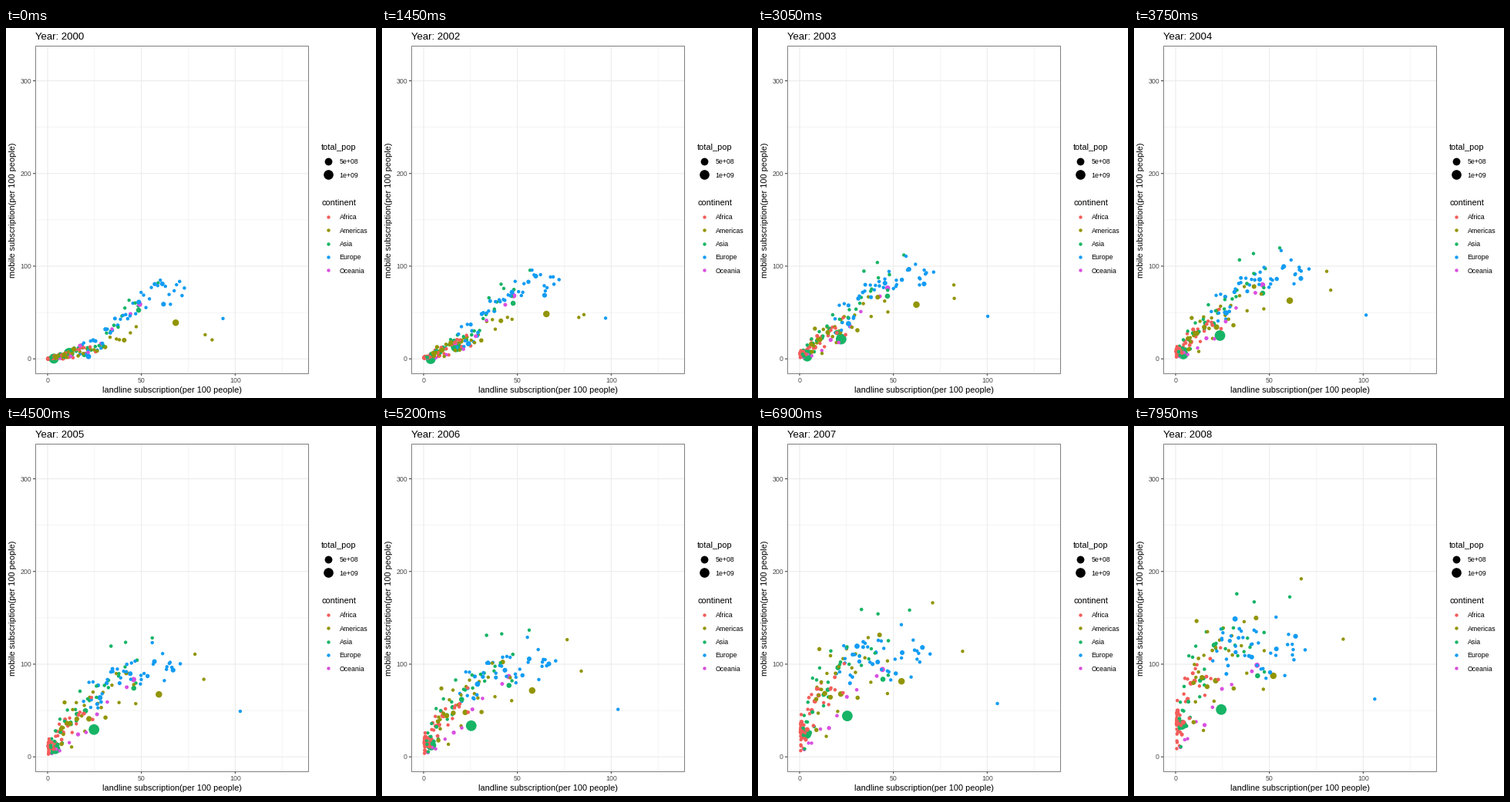
A matplotlib script for the animation above (8000 ms loop, 480 px wide and 480 px high).

```python
import numpy as np
import matplotlib.pyplot as plt
from matplotlib.animation import FuncAnimation
from matplotlib.patches import Rectangle

plt.rcParams["font.family"] = "Liberation Sans"
SIZE, DPI = 480, 100
FRAMES, STEP = 160, 50
YEARS_PER_FRAME = 9 / 170
SPAN = (FRAMES - 1) * YEARS_PER_FRAME
PT = 72 / DPI
SMALL = 4.4
LEFT, RIGHT, TOP, BOTTOM = 37.9, 391.9, 22.7, 447.7
COLORS = {"Africa": "#F35E5A", "Americas": "#929504", "Asia": "#17B466",
          "Europe": "#129CF3", "Oceania": "#D950E0"}

# count, landline range, skew towards the low end, first mobile ceiling,
# landline scale and shift, last mobile base, slope, ceiling and spread
GROUPS = {
    "Africa": (50, 0.2, 26, 4.0, 35, 0.95, 0.4, 28, 6.0, 90, 16),
    "Americas": (28, 4, 48, 1.8, 30, 0.85, 6, 72, 1.3, 125, 25),
    "Asia": (34, 1, 50, 1.7, 75, 0.95, 1, 45, 3.2, 118, 24),
    "Europe": (42, 17, 74, 1.1, 72, 0.82, 6, 112, 0.0, 112, 18),
    "Oceania": (10, 1, 54, 1.5, 55, 0.85, 1, 12, 2.2, 105, 10)}

# Standout dots: landline and mobile in the first, fourth and last year.
STANDOUTS = [
    ("Asia", 13.8, (11.4, 23.7, 24.4), (6, 25.3, 51)),
    ("Asia", 13, (3.3, 4.1, 3.3), (0.3, 5, 34.5)),
    ("Americas", 8.5, (68.3, 60.8, 52.1), (39, 63, 87.5)),
    ("Americas", 7.2, (17.8, 21.8, 21.4), (13.4, 34.5, 82)),
    ("Asia", 6.6, (48.5, 46.4, 43.7), (52.5, 71, 87.5)),
    ("Europe", 6.8, (21.8, 27, 31.7), (2.5, 50, 148.5)),
    ("Europe", 6.2, (61.8, 66.8, 64), (59, 87, 130)),
    ("Asia", SMALL, (58.9, 55.5, 60.8), (82, 120, 172.5)),
    ("Europe", SMALL, (93.5, 101.6, 106.2), (43.5, 47.3, 62.3)),
    ("Americas", SMALL, (84, 82.7, 89.3), (26, 74.5, 127)),
    ("Americas", SMALL, (87.7, 80.5, 67), (20.5, 95, 192))]

rng = np.random.default_rng(11)


def px(v):
    return 54 + 2.433 * v


def py(v):
    return 429.2 - 1.2023 * v


def make_group(n, low, high, skew, top, scale, shift, base, slope, cap, spread):
    """Start and end points, growth exponents and diameters of one group."""
    rank = (np.arange(n) + rng.uniform(0.2, 0.8, n)) / n
    x0 = low + (high - low) * rank ** skew
    y0 = top / (1 + np.exp((37 - x0) / 6)) * rng.uniform(0.7, 1.1, n)
    y0 += rng.uniform(0, 0.75, n) * np.minimum(x0, 18)
    x1 = x0 * scale + shift + rng.normal(0, 0.05, n) * x0
    y1 = np.minimum(base + slope * x1, cap) + rng.normal(0, spread, n)
    y1 = np.maximum(y1, y0 + rng.uniform(2, 12, n))
    power = 0.85 + 1.2 * np.exp(-y0 / 12)
    width = SMALL + 2.5 * rng.uniform(0, 1, n) ** 6
    return np.column_stack([x0, y0, x1, y1, power, width])


crowd = np.vstack([make_group(*g) for g in GROUPS.values()])
X0, Y0, X1, Y1, POWER, WIDTH = crowd.T
hues = [COLORS[name] for name, g in GROUPS.items() for _ in range(g[0])]
hues += [COLORS[s[0]] for s in STANDOUTS]
widths = np.append(WIDTH, [s[1] for s in STANDOUTS])
curves = [[np.polyfit([0, 4, SPAN], c, 2) for c in s[2:]] for s in STANDOUTS]

# Large dots lie under the small ones, which are mixed at random.
order = rng.permutation(len(widths))
order = order[np.argsort(-np.floor(widths[order] / 7), kind="stable")]


def at_year(year):
    u = year / SPAN
    free = np.column_stack([X0 + (X1 - X0) * u, Y0 + (Y1 - Y0) * u ** POWER])
    lead = [[np.polyval(cx, year), np.polyval(cy, year)] for cx, cy in curves]
    return np.vstack([free, lead])


def positions(year):
    """Straight, even moves between whole years."""
    low = np.floor(year)
    part = year - low
    xy = at_year(low) * (1 - part) + at_year(low + 1) * part
    return np.column_stack([px(xy[:, 0]), py(xy[:, 1])])[order]


def area(diameter):
    return (np.asarray(diameter) * PT) ** 2


fig = plt.figure(figsize=(SIZE / DPI, SIZE / DPI), dpi=DPI, facecolor="white")
ax = fig.add_axes([0, 0, 1, 1])
ax.set_xlim(0, SIZE)
ax.set_ylim(SIZE, 0)
ax.axis("off")


def label(x, y, text, size=8.8, color="black", **kw):
    return ax.text(x, y, text, fontsize=size * PT, color=color, **kw)


def line(xs, ys, color, width):
    ax.plot(xs, ys, color=color, lw=width * PT, solid_capstyle="butt",
            snap=False, zorder=1)


def dot(y, diameter, color, text):
    ax.scatter([418.1], [y], s=area(diameter), c=color, linewidths=0)
    label(432.5, y + 3.3, text)


for v in (25, 75, 125):
    line([px(v)] * 2, [TOP, BOTTOM], "#EBEBEB", 0.53)
for v in (50, 150, 250):
    line([LEFT, RIGHT], [py(v)] * 2, "#EBEBEB", 0.53)
for v in (0, 50, 100):
    line([px(v)] * 2, [TOP, BOTTOM], "#EBEBEB", 1.07)
    line([px(v)] * 2, [BOTTOM, BOTTOM + 3.2], "#333333", 1.07)
    label(px(v), 460, str(v), color="#4D4D4D", ha="center")
for v in (0, 100, 200, 300):
    line([LEFT, RIGHT], [py(v)] * 2, "#EBEBEB", 1.07)
    line([LEFT - 2.8, LEFT], [py(v)] * 2, "#333333", 1.07)
    label(33, py(v) + 3.1, str(v), color="#4D4D4D", ha="right")
ax.add_patch(Rectangle((LEFT, TOP), RIGHT - LEFT, BOTTOM - TOP, fill=False,
                       ec="#7F7F7F", lw=PT, zorder=5))

label(215.5, 473, "landline subscription(per 100 people)", 11, ha="center")
label(14, 236, "mobile subscription(per 100 people)", 11, rotation=90,
      ha="right", va="center")
title = label(38, 15, "", 13.2)

label(409, 158, "total_pop", 11)
dot(173, 9.8, "black", "5e+08")
dot(190.3, 12.6, "black", "1e+09")
label(409, 230, "continent", 11)
for i, (name, color) in enumerate(COLORS.items()):
    dot(245.2 + 17.28 * i, SMALL, color, name)

dots = ax.scatter(*positions(0).T, s=area(widths[order]),
                  c=[hues[i] for i in order], linewidths=0, zorder=3)


def update(i):
    year = i * YEARS_PER_FRAME
    # The small offset keeps exact halves on the lower year.
    title.set_text(f"Year: {2000 + int(np.floor(year + 0.5 - 1e-6))}")
    dots.set_offsets(positions(year))
    return title, dots


anim = FuncAnimation(fig, update, frames=FRAMES, interval=STEP,
                     repeat=True, repeat_delay=0)
plt.show()
```
